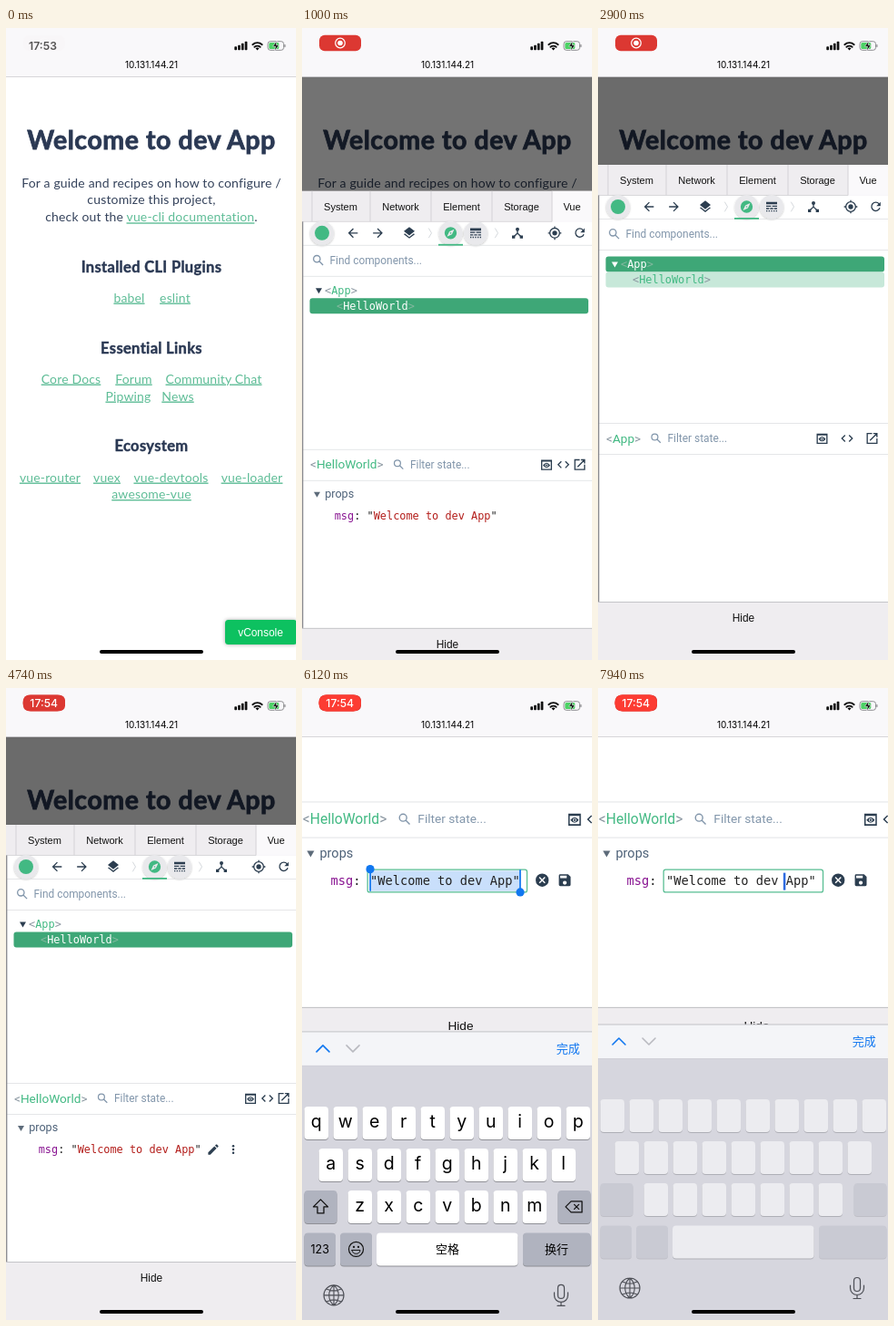
Animation, 319 px wide and 693 px high, one loop 7990 ms. Source, as an HTML page:

```html
<!DOCTYPE html>
<html lang="en">
<head>
<meta charset="utf-8">
<style>
html, body { margin: 0; width: 100%; height: 100%; overflow: hidden; background: #fff }
svg { display: block }
.page { font: 14px Lato, sans-serif; letter-spacing: .16px; fill: #34425b; text-anchor: middle }
.page .h1, .page .h3 { font-weight: 700; fill: #2a3853; stroke: #2a3853; stroke-width: .45px }
.page .h1 { font-size: 28.5px; letter-spacing: .55px; stroke-width: .8px }
.page .h3 { font-size: 16.5px; letter-spacing: .33px }
.link { fill: #5fbd97; text-decoration: underline }
.tab { font: 11.05px "Liberation Sans", Arial, sans-serif; fill: #111; text-anchor: middle }
.big { font-size: 11.9px }
.ui { font: 11.9px Roboto, sans-serif; fill: #8296ab }
.head { font: 13.6px Roboto, sans-serif; fill: #42b983 }
.mono { font: 11.9px "DejaVu Sans Mono", monospace; fill: #222 }
.row rect { fill: none }
.row text { fill: #42b983 }
.row path { fill: #2c3e50 }
.row .b, .head .b { fill: #8a96a0 }
.row.hover rect { fill: #c7e8d9 }
.row.sel rect { fill: #3ea777 }
.row.sel text, .row.sel path { fill: #fff }
.row.sel .b { fill: #84b89f }
.sf { font-family: Inter, sans-serif; text-anchor: middle }
.cjk { font: 13px "Noto Sans CJK SC", "Noto Sans CJK", sans-serif; text-anchor: middle }
.line { fill: none; stroke-linecap: round; stroke-linejoin: round }
</style>
</head>
<body>
<svg id="stage" width="319" height="693" viewBox="0 0 319 693"></svg>
<script>
const text = (x, y, s, cls = '', more = '') => `<text x="${x}" y="${y}" class="${cls}" ${more}>${s}</text>`;
const rect = (x, y, w, h, fill, more = '') => `<rect x="${x}" y="${y}" width="${w}" height="${h}" fill="${fill}" ${more}/>`;
const circle = (x, y, r, fill, more = '') => `<circle cx="${x}" cy="${y}" r="${r}" fill="${fill}" ${more}/>`;
const stroke = (d, color, w = 1.4) => `<path d="${d}" class="line" stroke="${color}" stroke-width="${w}"/>`;
const bracket = s => `<tspan class="b">&lt;</tspan>${s}<tspan class="b">&gt;</tspan>`;

// Icons live on a 24-unit grid; the pen is a 2-unit stroke.
const pen = d => `<path d="${d}" fill="none" stroke="currentColor" stroke-width="2"/>`;
const solid = d => `<path d="${d}" fill="currentColor" fill-rule="evenodd"/>`;
const icons = {
  back: pen('M20 12H5M12.7 4.7L5.4 12l7.3 7.3'),
  next: pen('M4 12H19M11.3 4.7L18.6 12l-7.3 7.3'),
  layers: solid('M12 2l9 7-9 7-9-7zM4.6 12.8L12 18.5l7.4-5.7L21 14l-9 7-9-7z'),
  compass: solid('M2 12a10 10 0 1 1 20 0a10 10 0 1 1-20 0zM14.2 14.2L18 6 9.8 9.8 6 18z') + circle(12, 12, 1.2, 'currentColor'),
  lines: solid('M3 4h18v4H3zM3 10h8v2H3zM13 10h8v2h-8z') + '<path d="M3 15h18" stroke="currentColor" stroke-width="2" stroke-dasharray="5 1.5"/><path d="M3 19h18" stroke="currentColor" stroke-width="2" stroke-dasharray="2"/>',
  hub: pen('M12 7v5.5M5.5 18.5l6.5-6.3 6.5 6.3') + circle(12, 6, 3, 'currentColor') + solid('M3 16h5v5H3zM16 16h5v5h-5z'),
  aim: pen('M12 1v4M12 19v4M1 12h4M19 12h4M4 12a8 8 0 1 1 16 0a8 8 0 1 1-16 0') + circle(12, 12, 4, 'currentColor'),
  reload: pen('M17.5 7.2A7 7 0 1 0 18.7 14') + solid('M20 4v7h-7z'),
  search: pen('M4 9.5a5.5 5.5 0 1 1 11 0a5.5 5.5 0 1 1-11 0M13.5 13.5l6.2 6.2'),
  preview: pen('M4 5h16v15H4zM4 6h16') + solid('M6 13q6-8 12 0q-6 8-12 0zM9.5 13a2.5 2.5 0 1 0 5 0a2.5 2.5 0 1 0-5 0z') + circle(12, 13, 1.5, 'currentColor'),
  code: pen('M8.7 6.7L3.4 12l5.3 5.3M15.3 6.7l5.3 5.3-5.3 5.3'),
  open: pen('M12 4H4v16h16v-8M14 4h6v6M19.5 4.5L8.5 15.5'),
  edit: solid('M3 17.2V21h3.8L17.8 10l-3.8-3.8zM20.7 7c.4-.4.4-1 0-1.4l-2.3-2.3c-.4-.4-1-.4-1.4 0l-1.9 1.8 3.8 3.8z'),
  more: [6, 12, 18].map(y => circle(12, y, 2, 'currentColor')).join(''),
  cancel: solid('M2 12a10 10 0 1 1 20 0a10 10 0 1 1-20 0zM7 8.4L10.6 12 7 15.6 8.4 17 12 13.4 15.6 17 17 15.6 13.4 12 17 8.4 15.6 7 12 10.6 8.4 7z'),
  save: solid('M5 3h12l4 4v12a2 2 0 0 1-2 2H5a2 2 0 0 1-2-2V5a2 2 0 0 1 2-2zM5 5v4h10V5zM9 16a3 3 0 1 0 6 0a3 3 0 1 0-6 0z'),
};
const icon = (name, x, y, size = 16, color = '#2c3e50') =>
  `<g color="${color}" transform="translate(${x - size / 2} ${y - size / 2}) scale(${size / 24})">${icons[name]}</g>`;

const links = [
  ['babel', 135.5, 296], ['eslint', 186, 296],
  ['Core Docs', 71.5, 385], ['Forum', 140.5, 385], ['Community Chat', 228.5, 385],
  ['Pipwing', 134.5, 404], ['News', 189, 404],
  ['vue-router', 48.5, 493], ['vuex', 111, 493], ['vue-devtools', 181.5, 493], ['vue-loader', 270.5, 493],
  ['awesome-vue', 160, 511.5],
];
const page = `<g class="page">
  ${text(160, 132.5, 'Welcome to dev App', 'h1')}
  ${text(160, 174.5, 'For a guide and recipes on how to configure /')}
  ${text(160, 193.3, 'customize this project,')}
  ${text(160, 212.3, 'check out the <tspan class="link">vue-cli documentation</tspan>.')}
  ${text(160, 267.5, 'Installed CLI Plugins', 'h3')}
  ${text(160, 356.5, 'Essential Links', 'h3')}
  ${text(160, 464, 'Ecosystem', 'h3')}
  ${links.map(([s, x, y]) => text(x, y + 4.5, s, 'link')).join('')}
</g>
${rect(241, 649, 79, 27, '#10c160', 'rx="3.5" filter="url(#glow)"')}
${text(280, 667, 'vConsole', 'tab big', 'style="fill:#fff"')}`;

const tabs = [['System', 42.5], ['Network', 108.5], ['Element', 175.5], ['Storage', 241.5], ['Vue', 297]];
const button = x => circle(x, 196, 13, '#e9e9ec', 'filter="url(#soft)"');
const treeRow = (id, x, y, name, arrow) => `<g id="${id}" class="row">
  ${rect(8.5, y - 8.5, 306.5, 17, '', 'rx="3"')}
  ${arrow ? `<path d="M15 ${y - 2.5}h7l-3.5 6z"/>` : ''}
  ${text(x, y + 4, bracket(name), 'mono')}</g>`;
const stateHead = (name, x, tools) => text(9, 454.5, bracket(name), 'head')
  + icon('search', x, 450, 15, '#8296ab') + text(x + 12.5, 453.8, 'Filter state...', 'ui')
  + ['preview', 'code', 'open'].map((n, i) => icon(n, tools[i], 450)).join('');

const panel = `<g id="panel">
  ${rect(-20, 150, 360, 700, '#fff')}
  ${rect(0, 150, 320, 33.5, '#efedf0')}${rect(275, 150, 45, 33.5, '#faf9fb')}
  ${[11, 75, 142, 209, 275].map(x => rect(x - .5, 150, 1, 33.5, '#d3d2d5')).join('')}
  ${rect(0, 183, 275, .8, '#d3d2d5')}
  ${tabs.map(([s, x]) => text(x, 171, s, 'tab')).join('')}
  ${[22, 163.5, 191].map(button).join('')}${circle(22, 196, 8, '#42b983')}
  ${icon('back', 56, 196)}${icon('next', 83.5, 196)}${icon('layers', 118, 196)}
  ${icon('compass', 163.5, 196, 16, '#42b983')}${icon('lines', 191, 196)}
  ${icon('hub', 237, 196)}${icon('aim', 278, 196)}${icon('reload', 305.5, 196)}
  ${stroke('M139.5 191l3 5-3 5M212.5 191l3 5-3 5', '#d5d9dd', 1)}
  ${[209, 243, 433, 467].map(y => rect(0, y, 320, .9, '#e2e4e6')).join('')}
  ${rect(150, 208, 27, 1.8, '#42b983')}
  ${icon('search', 18, 226, 16, '#8296ab')}${text(30.5, 230, 'Find components...', 'ui')}
  ${treeRow('app', 25, 259, 'App', true)}
  ${treeRow('hello', 38, 276, 'HelloWorld')}
  <g id="appState">${stateHead('App', 64, [246.5, 274, 301.5])}</g>
  <g id="helloState">
    ${stateHead('HelloWorld', 106.5, [269, 287.5, 305.5])}
    <path d="M13 480h7l-3.5 6z" fill="#5d6b7a"/>
    ${text(25.2, 486.3, 'props', 'ui', 'style="font-size:12.6px;fill:#4d6178"')}
    <g id="view">
      ${text(35.7, 510, '<tspan fill="#881391">msg</tspan>: "<tspan fill="#b31d1a">Welcome to dev App</tspan>"', 'mono')}
      <g id="tools">${icon('edit', 228, 506, 15)}${icon('more', 250, 506, 15)}</g>
    </g>
    <g id="field">
      ${rect(71, 498, 152.5, 21.5, '#fff', 'rx="2" stroke="#57bd92" stroke-width="1.1"')}
      <g id="selection">${rect(73.5, 499, 143.5, 19.5, '#c9dffb')}</g>
      ${text(35.7, 512.3, '<tspan fill="#881391">msg</tspan>:', 'mono')}
      ${text(73.5, 512.3, '"Welcome to dev App"', 'mono')}
      <g id="handles">
        ${rect(72.8, 498, 1.5, 20.5, '#1177f0')}${rect(216.2, 498, 1.5, 20.5, '#1177f0')}
        ${circle(73.5, 497.5, 4, '#1177f0')}${circle(217, 519.5, 4, '#1177f0')}
      </g>
      ${rect(-1.1, 501, 2.2, 16.5, '#2f6be0', 'id="caret"')}
      ${icon('cancel', 238, 508, 15)}${icon('save', 259.6, 508, 15)}
    </g>
  </g>
  ${rect(0, 183.5, 1.4, 446, '#8f8f93')}
  ${rect(-20, 629.5, 360, 220, '#efedf0')}${rect(-20, 629, 360, 1, '#c4c4c8')}
  ${text(160, 650.9, 'Hide', 'tab big')}
</g>`;

let keys = '', specials = '', labels = '';
const cap = (x, y, w, fill) => rect(x, y + 1, w, 36, '#8f9096', 'rx="4"') + rect(x, y, w, 36, fill, 'rx="4"');
const key = (x, y, w, label) => {
  keys += cap(x, y, w, '#fff');
  labels += label;
};
const special = (x, y, w, label) => {
  specials += cap(x, y, w, '#b0b3bf');
  labels += label;
};
[['qwertyuiop', 2.5], ['asdfghjkl', 18.5], ['zxcvbnm', 50.5]].forEach(([row, x0], r) =>
  [...row].forEach((c, i) => key(x0 + 32 * i, 82 + 46 * r, 26.5,
    text(x0 + 32 * i + 13.2, 105.5 + 46 * r, c, 'sf', 'font-size="19.5"'))));
special(2.5, 174, 36, stroke('M20.5 184l-8 8h4.5v7h7v-7h4.5z', '#111', 1.3));
special(281.5, 174, 36, stroke('M290 192l6-6h12v12h-12zM299.5 189.5l5 5M304.5 189.5l-5 5', '#111', 1.3));
special(2.5, 220.5, 34.5, text(19.7, 243, '123', 'sf', 'font-size="12.5"'));
special(42, 220.5, 35, circle(59.5, 238.5, 8, 'none', 'stroke="#111" stroke-width="1.2"')
  + circle(57, 236, 1.1, '#111') + circle(62, 236, 1.1, '#111')
  + stroke('M55 239.5h9a4.5 4 0 0 1-9 0z', '#111', 1));
key(82, 220.5, 155.5, text(160, 243.5, '空格', 'cjk'));
special(243, 220.5, 74.5, text(280, 243.5, '换行', 'cjk'));

const keyboard = `<g id="keyboard">
  ${rect(0, 0, 319, 345, '#d6d6de')}${rect(0, 0, 319, 37, '#f4f5f8')}
  ${rect(0, -.5, 319, 1, '#c2c2c8')}${rect(0, 37, 319, .6, '#cfcfd6')}
  ${stroke('M16 22l7-7 7 7', '#1177f0', 1.6)}${stroke('M49 15l7 7 7-7', '#b9bac0', 1.6)}
  ${text(292.7, 23.3, '完成', 'cjk', 'fill="#1177f0" font-weight="500"')}
  <g id="keys">${keys}</g><g id="specials">${specials}</g><g id="labels">${labels}</g>
  ${stroke('M24 289a11 11 0 1 1 22 0a11 11 0 1 1-22 0h22M35 278v22M35 278c-7 6-7 16 0 22c7-6 7-16 0-22M27 282q8 4 16 0M27 296q8-4 16 0', '#4c4e55', 1.1)}
  ${stroke('M281.5 281a3.5 3.5 0 0 1 7 0v8a3.5 3.5 0 0 1-7 0zM277.5 286v3a7.5 7.5 0 0 0 15 0v-3M285 296.5v4M281 300.5h8', '#4c4e55', 1.2)}
</g>`;

const statusBar = `${rect(0, 0, 319, 53.5, '#f9f8fa')}${rect(0, 0, 319, 53.5, 'url(#shade)', 'id="tint"')}
  ${rect(0, 53, 319, .8, '#cfced1')}
  ${text(40.5, 23.5, '17:53', 'sf', 'id="clock" font-size="12.2" font-weight="600" fill="#555"')}
  <g id="pill">${rect(19, 7.7, 46, 17.6, '#dc3832', 'rx="6"')}
    ${rect(18.5, 7.5, 46.5, 18, '#dc3832', 'id="timePill" rx="8.5"')}
    ${rect(18.5, 7.5, 46.5, 18, '#fc3c33', 'id="brightPill" rx="8.5"')}
    <g id="dot">${circle(42, 16.5, 5.3, 'none', 'stroke="#fff" stroke-width="1.2"')}${circle(42, 16.5, 2.8, '#fff')}</g>
    ${text(41.7, 21, '17:54', 'sf', 'id="time" font-size="12.2" font-weight="500" fill="#fff"')}
  </g>
  ${[4, 5.5, 7.5, 9.5].map((h, i) => rect(251.3 + 3.8 * i, 24.3 - h, 2.7, h, '#111', 'rx=".8"')).join('')}
  ${stroke('M271.3 18.2a7.6 7.6 0 0 1 10.4 0M273.4 20.8a4.6 4.6 0 0 1 6.2 0', '#111', 1.9)}
  <path d="M274.5 22.3a3 3 0 0 1 4 0l-2 2.2z"/>
  ${rect(288, 14.7, 17.5, 9.6, 'none', 'rx="2.8" stroke="#8d8d90"')}${rect(306.3, 18, 1.2, 3.2, '#8d8d90', 'rx=".6"')}
  ${rect(289.3, 16, 11, 7, '#4cd265', 'rx="1.5"')}
  <path d="M298 14l-4.5 6.2h3l-1 5 4.7-6.4h-3.1z" stroke="#f9f8fa" stroke-width=".6"/>
  ${text(160, 43.8, '10.131.144.21', 'sf', 'font-size="10"')}`;

document.getElementById('stage').innerHTML = `<defs>
  <filter id="glow" x="-20%" y="-50%" width="140%" height="200%"><feDropShadow dx="0" dy="0" stdDeviation="2" flood-opacity=".35"/></filter>
  <filter id="soft" x="-30%" y="-30%" width="160%" height="160%"><feDropShadow dx="0" dy="1" stdDeviation="1" flood-opacity=".25"/></filter>
  <linearGradient id="shade" x2="0" y2="1"><stop stop-opacity=".07"/><stop offset="1" stop-opacity=".14"/></linearGradient>
</defs>
${rect(0, 0, 319, 693, '#fff')}
<g id="web">${page}${rect(-20, 0, 360, 900, '#000', 'id="mask"')}${panel}</g>
${keyboard}${statusBar}${rect(103, 682, 114, 4, '#000', 'rx="2"')}`;

const el = {};
document.querySelectorAll('[id]').forEach(n => el[n.id] = n);
const show = (name, on) => el[name].style.display = on ? '' : 'none';
const fade = (name, v) => el[name].style.opacity = v;
const move = (name, v) => el[name].setAttribute('transform', v);
const ramp = (t, from, to) => Math.min(1, Math.max(0, (t - from) / (to - from)));

const LOOP = 7990;
function draw(t) {
  // recording pill
  const pill = ramp(t, 0, 430), timed = ramp(t, 4380, 4700);
  fade('pill', pill);
  fade('clock', 1 - pill);
  fade('timePill', timed);
  fade('time', timed);
  fade('dot', 1 - timed);
  fade('brightPill', ramp(t, 5440, 5700));

  // panel slides up
  const up = 1 - (1 - ramp(t, 780, 1080)) ** 2.2;
  fade('mask', .58 * up);
  move('panel', `translate(0 ${543 * (1 - up)})`);

  // component tree
  const appSelected = t >= 2500 && t < 3120;
  el.app.setAttribute('class', 'row' + (appSelected ? ' sel' : t >= 2350 && t < 2500 ? ' hover' : ''));
  el.hello.setAttribute('class', 'row' + (!appSelected ? ' sel' : t >= 2900 ? ' hover' : ''));
  const appState = t >= 2600 && t < 3220;
  show('appState', appState);
  show('helloState', !appState);

  // editing
  const editing = t >= 5690, tracking = t >= 7050;
  show('tools', t >= 4590);
  show('view', !editing);
  show('field', editing);
  show('selection', !tracking);
  show('handles', !tracking);
  fade('handles', ramp(t, 5810, 5970));
  show('caret', tracking);
  const glide = 1 - (1 - ramp(t, 7250, 7940)) ** 2;
  move('caret', `translate(${217 - 30.4 * glide} 0)`);

  // page zooms to the field while the keyboard springs in
  const z = ramp(t, 5805, 6105), zoom = z * z * (3 - 2 * z);
  move('web', `translate(${-9.5 * zoom} ${-373.5 * zoom}) scale(${1 + .15 * zoom})`);
  fade('tint', 2 * zoom * (1 - zoom));
  const s = Math.max(0, t - 5808) * .0179;
  const rise = 1 - Math.exp(-s) * (1 + s);
  move('keyboard', `translate(0 ${694 - 325 * rise})`);

  // blank keys while the space bar is held
  const blank = ramp(t, 6940, 7200);
  fade('keys', 1 - .45 * blank);
  fade('specials', 1 - .68 * blank);
  fade('labels', 1 - blank);
}

const start = performance.now();
(function tick() {
  draw((performance.now() - start) % LOOP);
  requestAnimationFrame(tick);
})();
</script>
</body>
</html>
```
